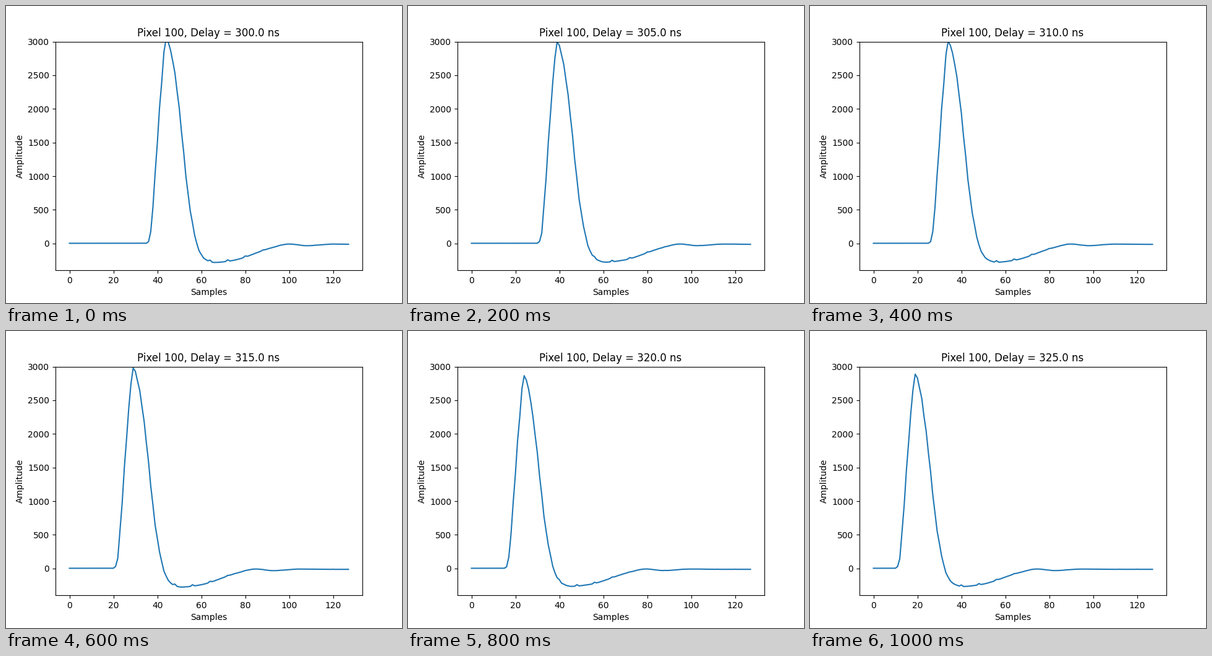
A matplotlib script for the animation above (1200 ms loop, 640x480 px).

```python
import numpy as np
import matplotlib.pyplot as plt
from matplotlib.animation import FuncAnimation

STEP = 5            # samples and nanoseconds per frame
JITTER = 0.05       # sampling time offset between even and odd cells
SAMPLES = np.arange(128)

# Key points of the pulse: time from the peak, amplitude
KNOTS = np.array([
    (-60, 2), (-9, 3), (-8, 28), (-7, 165), (-6, 560), (-2, 2415), (0, 3045),
    (3, 2720), (5, 2275), (11, 490), (15, -105), (18, -240), (22, -283),
    (30, -255), (48, -65), (56, -9), (64, -34), (76, -10), (90, -14),
    (140, -14)], float)

PEAKS = [3045, 2995, 3005, 2980, 2866, 2888]


def smooth_curve(x, knots):
    """Monotone cubic through the knots."""
    kx, ky = knots.T
    width = np.diff(kx)
    slope = np.diff(ky) / width
    a, b = slope[:-1], slope[1:]
    tangent = np.zeros_like(kx)
    same = a * b > 0
    tangent[1:-1][same] = 2 * a[same] * b[same] / (a + b)[same]
    k = np.clip(np.searchsorted(kx, x) - 1, 0, len(width) - 1)
    h = width[k]
    u = (x - kx[k]) / h
    ease = u * u * (3 - 2 * u)
    return (ky[k] + (ky[k + 1] - ky[k]) * ease
            + h * u * (1 - u) * (tangent[k] * (1 - u) - tangent[k + 1] * u))


def waveform(i):
    t = SAMPLES - (44 - STEP * i) + np.where(SAMPLES % 2, JITTER, -JITTER)
    # Lower pulses also fall a little sooner
    loss = 1 - PEAKS[i] / PEAKS[0]
    sooner = 10 * loss * np.clip(t / 4, 0, 1)
    y = (1 - loss) * smooth_curve(t + sooner, KNOTS)
    # Every eighth cell reads slightly high in the undershoot
    high = (SAMPLES % 8 == 0) & (t > 14)
    return y + high * 0.08 * np.abs(y)


fig, ax = plt.subplots(figsize=(6.4, 4.8), dpi=100)
line, = ax.plot(SAMPLES, waveform(0))
ax.set_ylim(-400, 3000)
ax.set_xlabel("Samples")
ax.set_ylabel("Amplitude")
title = ax.set_title("", x=0.498)


def update(i):
    line.set_ydata(waveform(i))
    title.set_text(f"Pixel 100, Delay = {300 + STEP * i:.1f} ns")
    return line, title


anim = FuncAnimation(fig, update, frames=len(PEAKS), interval=200,
                     repeat=True, repeat_delay=0)
plt.show()
```
